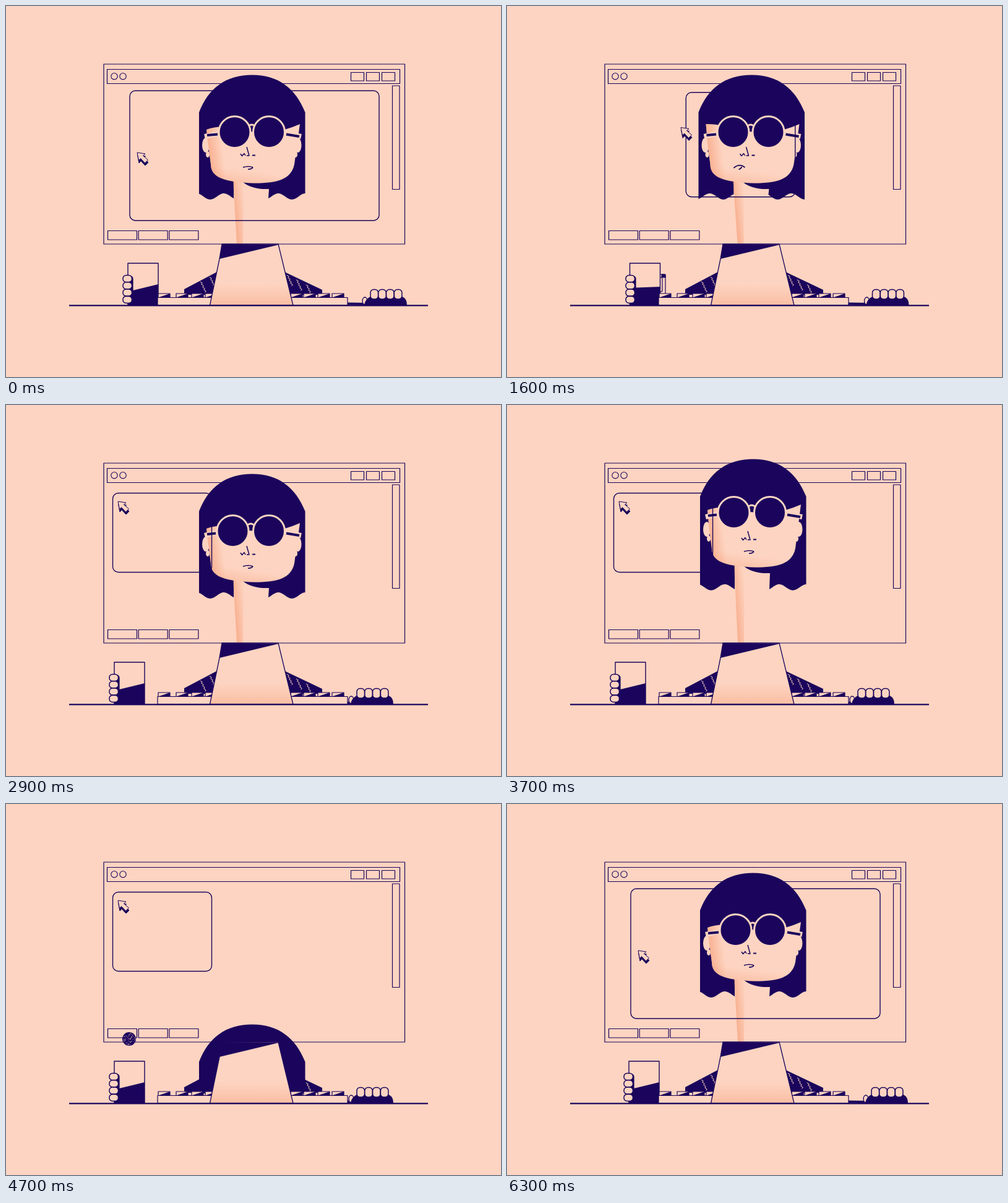
Animation of 800 by 600 pixels, one loop 6400 ms. Source, as an HTML page with a canvas:

```html
<!DOCTYPE html>
<html lang="en">
<head>
<meta charset="utf-8">
<title>Desk</title>
<style>
html, body { margin: 0; width: 100%; height: 100%; overflow: hidden; background: #fdd4c1; }
canvas { display: block; }
</style>
</head>
<body>
<canvas id="stage" width="800" height="600"></canvas>
<script>
const c = document.getElementById('stage').getContext('2d');
const SKIN = '#fdd4c1', INK = '#1b055c', LOOP = 6400, STEP = 100;

function ease(t, from, to) {
  const u = Math.min(1, Math.max(0, (t - from) / (to - from)));
  return u * u * (3 - 2 * u);
}

// Rises from a to b, holds, falls from c to d.
const pulse = (t, a, b, c, d) => ease(t, a, b) - ease(t, c, d);

function random(seed) {
  return () => (seed = (seed * 16807) % 2147483647) / 2147483647;
}

function paint(fill, stroke, width = 1.3) {
  if (fill) { c.fillStyle = fill; c.fill(); }
  if (stroke) { c.strokeStyle = stroke; c.lineWidth = width; c.stroke(); }
}

function poly(points, fill, stroke, width, open) {
  c.beginPath();
  for (let i = 0; i < points.length; i += 2) c.lineTo(points[i], points[i + 1]);
  if (!open) c.closePath();
  paint(fill, stroke, width);
}

const line = (points, width = 1.5, color = INK) => poly(points, null, color, width, true);

function box(x, y, w, h, r = 0, fill = null, width = 1.2) {
  c.beginPath();
  c.roundRect(x, y, w, h, r);
  paint(fill, INK, width);
}

function oval(x, y, rx, ry, fill, stroke, width) {
  c.beginPath();
  c.ellipse(x, y, rx, ry, 0, 0, 7);
  paint(fill, stroke, width);
}

function curve(x0, y0, cx, cy, x1, y1) {
  c.beginPath();
  c.moveTo(x0, y0);
  c.quadraticCurveTo(cx, cy, x1, y1);
  paint(null, INK, 1.7);
}

function fade(x0, y0, x1, y1, alpha) {
  const g = c.createLinearGradient(x0, y0, x1, y1);
  g.addColorStop(0, `rgba(247,160,122,${alpha})`);
  g.addColorStop(1, 'rgba(247,160,122,0)');
  return g;
}

function stipple(x, y, r, count, color) {
  const rnd = random(91);
  c.fillStyle = color;
  for (let i = 0; i < count; i++) {
    const a = rnd() * 6.283, d = r * Math.sqrt(rnd());
    c.fillRect(x + d * Math.cos(a), y + d * Math.sin(a), 0.8, 0.8);
  }
}

// Runs draw with the origin moved and scaled.
function placed(x, y, scale, draw) {
  if (scale < 0.01) return;
  c.save();
  c.translate(x, y);
  c.scale(scale, scale);
  draw();
  c.restore();
}

function monitor() {
  box(158, 94, 486.5, 291);
  box(163.5, 102.5, 473, 23);
  box(624.5, 129, 11.5, 167.5);
  for (let i = 0; i < 3; i++) {
    if (i < 2) oval(175 + i * 14, 113.7, 5.2, 5.2, null, INK, 1.1);
    box(557.5 + i * 25, 107.5, 21, 13.5);
    box(164.5 + i * 49.7, 363.5, 47, 14.5);
  }
}

function shoulders() {
  poly([288, 458, 341, 430, 341, 467, 288, 467], INK);
  poly([450, 430, 511, 459, 511, 467, 450, 467], INK);
  for (const x of [315, 330, 455, 470, 486]) {
    const top = 433 + (Math.abs(x - 395.5) - 55) / 2, points = [];
    for (let i = 0; i < 9; i++) points.push(x + i + (i % 2) * 2.4 - 1.2, top + i * 2.2);
    line(points, 1, SKIN);
  }
}

// The band leans from its fixed foot at the screen edge towards the chin.
function neckShade(hx, dy) {
  const lean = hx * 0.0058;
  c.save();
  c.transform(1, 0, -lean, 1, hx * 0.14 + lean * 384, 0);
  poly([367, 281 + dy, 384, 283 + dy, 383, 384, 373, 384], fade(367, 330, 388, 328, 0.75));
  c.restore();
}

function hair(hx, dy, lag, turn) {
  const low = hx + lag, drop = dy < 0 ? dy * 0.55 : dy, n = hx * 0.62;
  const hem = (from, to) => {
    const step = (to - from) / 16;
    for (let i = 0; i <= 16; i++) {
      const x = from + i * step;
      c.lineTo(x, 308 + drop - 5 * Math.cos((x - low - 352) / 7 + Math.PI * turn));
    }
  };
  c.beginPath();
  c.moveTo(312 + hx, 172 + dy);
  c.bezierCurveTo(327 + hx, 133 + dy, 355 + hx, 111.5 + dy, 398 + hx, 111.5 + dy);
  c.bezierCurveTo(440 + hx, 111.5 + dy, 468 + hx, 133 + dy, 483.5 + hx, 172 + dy);
  hem(483.5 + low, 424 + n);
  c.lineTo(425 + n, 296 + dy);
  c.quadraticCurveTo(398 + n, 297 + dy, 383 + n, 285 + dy);
  c.lineTo(368 + n, 280 + dy);
  hem(368 + n, 312 + low);
  c.closePath();
  paint(INK);
}

function glasses(gap) {
  line([321, 211, 345 - gap, 206], 8, SKIN);
  line([325, 209, 342 - gap, 207.5], 4.2);
  line([451, 206, 477, 211], 8, SKIN);
  line([453, 207.5, 474, 211], 4.2);
  c.beginPath();
  c.arc(397 - gap / 2, 199, 7, 3.6, 5.8);
  paint(null, SKIN, 3);
  for (const x of [369.5 - gap, 425]) oval(x, 204, 25.5, 25.5, INK, SKIN, 3);
}

function mouth(mood) {
  if (mood > 0) {
    curve(381, 254, 389, 260, 398, 256);
    curve(395, 262, 399, 262, 399, 257);
    curve(364, 251, 363, 256, 360, 258);
    curve(417, 252, 418, 257, 421, 259);
  } else if (mood < 0) {
    curve(369, 262, 378, 254, 387, 261);
    curve(377, 264, 380, 264, 382, 260);
  } else {
    curve(383, 261, 392, 258, 399, 261);
    curve(399, 261, 397, 264, 391, 264);
  }
}

function face(mood, lift, turn, gap) {
  for (const x of [323, 471.5]) oval(x, 225, 6, 12, SKIN);
  for (const x of [326, 468]) oval(x, 240, 3, 5, SKIN);

  c.beginPath();
  c.moveTo(324, 200 - 9 * turn + lift);
  c.quadraticCurveTo(350, 190 + lift, 375, 202 + lift);
  c.lineTo(425, 205 + lift);
  c.quadraticCurveTo(450, 202 + lift, 475, 191 + lift);
  c.lineTo(466, 256);
  c.bezierCurveTo(461, 281, 437, 286.5, 402, 286.5);
  c.bezierCurveTo(352, 285, 331, 277, 331, 256);
  c.lineTo(327, 226);
  c.closePath();
  paint(SKIN);
  paint(fade(327, 240, 351, 237, 0.7));
  paint(fade(385, 288, 388, 266, 0.35));

  placed(0, lift, 1, () => glasses(gap));
  line([379, 239, 381.5, 242.5, 385, 238.5, 387, 242]);
  line([389, 228, 393, 242, 389, 242]);
  line([398, 241.5, 403, 241.5], 2);
  mouth(mood);
}

function cursor() {
  const arrow = [0, 0, 13, 2, 9.5, 5, 17.5, 12, 12.5, 17, 5.5, 9.5, 2.5, 13];
  placed(0.5, 4, 1, () => poly(arrow, INK, INK, 1));
  poly(arrow, SKIN, INK, 1);
}

function bulb() {
  oval(0, 0, 17.8, 17.8, SKIN, INK, 1.4);
  const zigzag = [];
  for (let i = 0; i < 6; i++) zigzag.push(i * 3 - 8, (i % 2 ? -4 : 3) - i * 0.3);
  line(zigzag, 1.4);
  c.rotate(-0.27);
  box(-4, 17, 9.5, 12.5, 0, SKIN, 1.3);
  box(-4, 17, 9.5, 5, 0, INK, 1);
}

function cloud() {
  for (const stroke of [INK, null]) {
    for (let i = 0; i < 5; i++) {
      const a = i * Math.PI * 0.4 - 1.2;
      oval(15 * Math.cos(a), 15 * Math.sin(a), 15.5, 15.5, SKIN, stroke, 1.2);
    }
  }
  stipple(0, 0, 29, 2300, INK);
  poly([0, 7, 12, 16, 4, 19], SKIN, INK, 0.8);
}

function keyboard() {
  box(245, 471.5, 307, 12.5, 0, SKIN);
  for (const x of [246, 275, 300, 322, 460, 481, 504, 527]) {
    box(x, 465, 19, 6.5, 0, SKIN);
    poly([x + 19, 465, x + 19, 471.5, x, 471.5], INK);
  }
}

function stand() {
  poly([349, 385, 440, 385, 464, 484, 329.5, 484, 345, 409], SKIN);
  paint(fade(397, 486, 397, 450, 0.45), INK, 1.3);
  poly([349, 385, 441, 386, 345, 409], INK);
}

function mouse(click) {
  oval(580, 477, 4, 6, SKIN, INK, 1.3);
  c.beginPath();
  c.moveTo(579, 484);
  c.bezierCurveTo(582, 464, 604, 468, 615, 468);
  c.bezierCurveTo(640, 467, 648, 470, 648, 484);
  paint(INK);
  for (let i = 0; i < 4; i++) box(589 + i * 12.8, 458.5 - (i === 3 ? click : 0), 12.5, 15.5, 5, SKIN, 1.5);
}

function mug(handle, slosh) {
  if (handle > 1) {
    box(240, 434, 6 + handle, 33, 3, SKIN);
    box(240, 439, 1 + handle, 23, 2, SKIN);
    box(240 + handle, 434, 6, 5, 0, INK);
  }
  box(197, 416, 49, 68, 0, SKIN, 1.4);
  poly([197, 462, 207, 459.5 - slosh, 246, 450 + slosh, 246, 484, 197, 484], INK);
}

function grip() {
  box(193, 437, 12, 43, 4, INK);
  for (let i = 0; i < 4; i++) box(189, 435.5 + i * 11.3, 14.5, 11, 5, SKIN, 1.5);
}

function draw(t) {
  const right = pulse(t, 300, 900, 1300, 1900);
  const left = pulse(t, 1300, 1900, 2300, 2800);
  const parked = pulse(t, 1300, 1900, 5300, 5900);
  const duck = pulse(t, 3900, 4400, 4900, 5400);
  const turn = right + left;
  const hx = 56 * right - 61 * left;
  const dy = 245 * duck - 24 * pulse(t, 3400, 3700, 3900, 4400);
  const lag = 11 * pulse(t, 700, 1000, 1000, 1300);
  const hand = 22.5 * right + 2.5 * left - 22 * parked;
  const mood = t >= 600 && t < 1500 ? 1 : t >= 1600 && t < 2500 ? -1 : 0;
  const bulbSize = pulse(t, 600, 900, 1200, 1500);
  const cloudSize = pulse(t, 1700, 2000, 2200, 2500);
  const winLeft = 200 + 206 * right - 27.5 * parked, winTop = 137 + 5.5 * parked;
  const winRight = 603 - 4 * right - 270.5 * parked, winBottom = 347 - 76.5 * parked;

  c.fillStyle = SKIN;
  c.fillRect(0, 0, 800, 600);
  c.lineJoin = 'round';
  monitor();
  shoulders();

  c.save();
  c.beginPath();
  c.rect(0, 0, 800, 468);
  c.clip();
  hair(hx, dy, lag, turn);
  if (dy < 60) neckShade(hx, dy);
  if (dy < 200) placed(hx, dy, 1, () => face(mood, Math.min(0, dy / 4), turn, 3 * parked));
  c.restore();

  box(winLeft, winTop, winRight - winLeft, winBottom - winTop, 9, null, 1.4);
  placed(212 + 169 * right - 31 * parked, 237 - 81 * parked, 1, cursor);
  placed(400 - 73 * ease(t, 600, 1000), 180, bulbSize, bulb);
  placed(370 + 65 * ease(t, 1700, 2100), 202, cloudSize, cloud);
  if (t >= 4200 && t < 5000) {
    const u = (t - 4200) / 500, x = 360 - 161 * Math.min(u, 1), y = 330 - 270 * u + 320 * u * u;
    oval(x, y, 11, 11, INK);
    stipple(x, y, 10, 70, SKIN);
  }

  placed(hand, 0, 1, () => mug(10 * right + 7 * left, 8 * left));
  keyboard();
  stand();
  line([552, 481.5, 582 + hand, 482], 4);
  placed(hand, 0, 1, () => mouse(8 * pulse(t, 1900, 2050, 2200, 2350)));
  placed(hand + 3 * right, 0, 1, grip);
  line([102, 484.3, 682, 484.3], 2.3);
}

const start = performance.now();
function tick() {
  const t = (performance.now() - start) % LOOP;
  draw(Math.floor(t / STEP) * STEP);
  requestAnimationFrame(tick);
}
tick();
</script>
</body>
</html>
```
